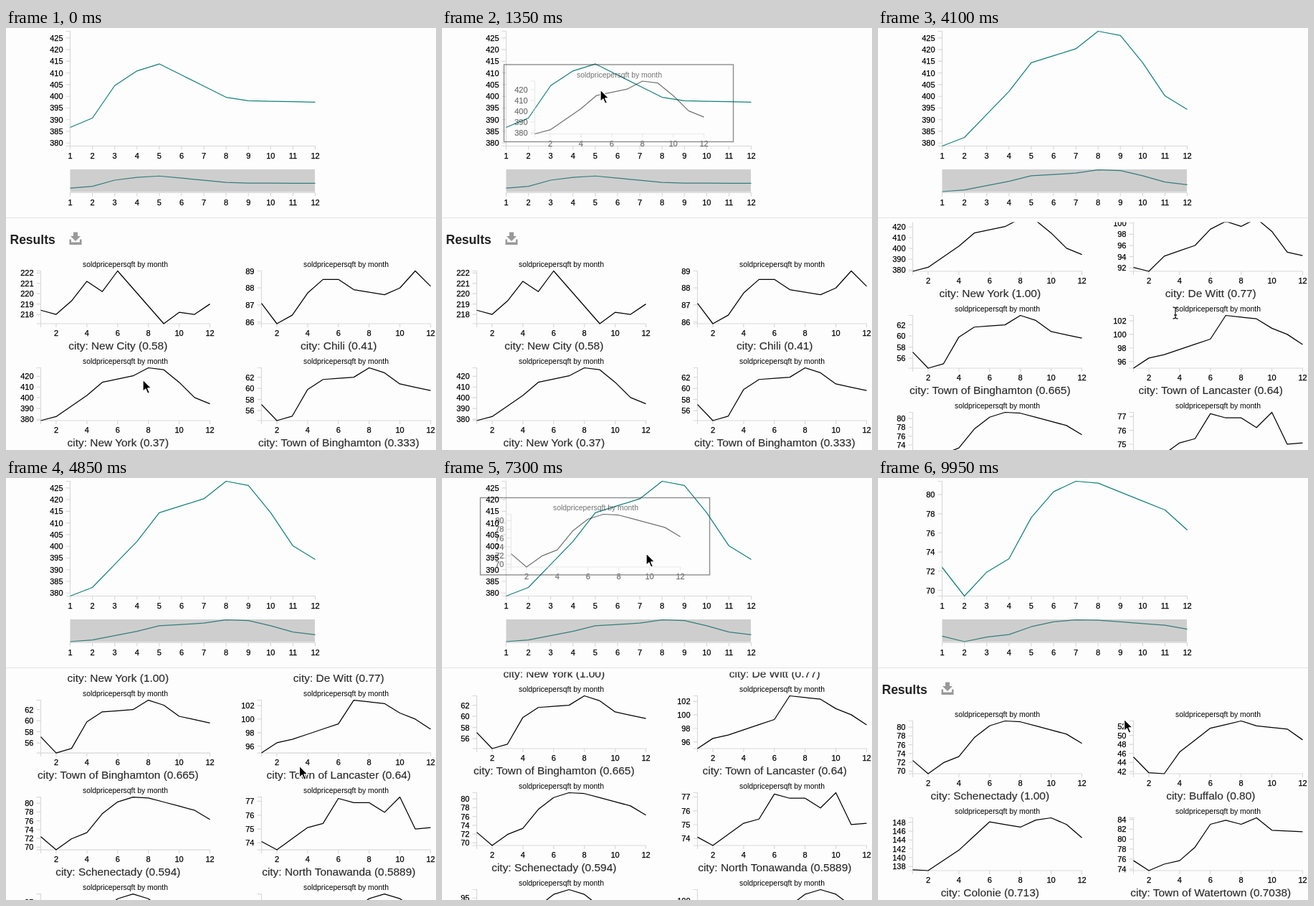
Animation, 600 px wide and 588 px high, one loop 10 s. Source, as an HTML page:

```html
<!DOCTYPE html>
<html lang="en">
<head>
<meta charset="utf-8">
<title>Price trends</title>
<style>
html, body { margin: 0; width: 100%; height: 100%; overflow: hidden; background: #fdfdfd; }
svg { display: block; width: 600px; height: 588px; }
text { font-family: "Liberation Sans", Arial, sans-serif; fill: #000; }
.tick { font-size: 11px; stroke: #000; stroke-width: .25; }
.title { font-size: 10.4px; text-anchor: middle; }
.city { font-size: 15.45px; text-anchor: middle; fill: #2a2a2a; stroke: #2a2a2a; stroke-width: .15; }
.head { font-size: 17.5px; font-weight: bold; fill: #222; }
.axis { fill: none; stroke: #d9d9d9; stroke-width: 1.2; }
.line { fill: none; stroke: #000; stroke-width: 1.25; stroke-linejoin: round; }
.teal { stroke: #14807a; }
</style>
</head>
<body>
<svg viewBox="0 0 600 588">
  <defs><clipPath id="pane"><rect y="270.5" width="600" height="318"/></clipPath></defs>
  <rect width="600" height="588" fill="#fdfdfd"/>
  <g id="mains"></g>
  <path d="M0 264.5H600" stroke="#e3e3e3"/>
  <g clip-path="url(#pane)">
    <g id="scroll">
      <text class="head" x="5.5" y="301">Results</text>
      <path fill="#999" d="M94 284.5h6v5.5h4L97 297 90 290h4zM88.5 294.5h2.5v4h12v-4h2.5v7.5h-17z"/>
      <g id="lists"></g>
    </g>
  </g>
  <path id="spin" fill="#82dada" d="M0-51A51 51 0 0 1 0 51A53.2 51 0 0 0 0-51z"/>
  <g id="ghosts"></g>
  <g id="cursor">
    <path stroke="#fff" stroke-width="1.3" stroke-linejoin="round"
      d="M0 0V16.5L3.9 13 6.6 19.3 9.4 18.1 6.7 12H12z"/>
    <g id="mover"></g>
    <path fill="none" stroke="#222" stroke-width="1.3"
      d="M-3.5-8Q0-8 0-6V6Q0 8-3.5 8M3.5-8Q0-8 0-6V6Q0 8 3.5 8M-2 3H2"/>
  </g>
</svg>
<script>
const LOOP = 10000, ROW = 135, COL = 308, MONTHS = 12;
const $ = id => document.getElementById(id);

// Straight runs between the key values that are given
function fill(keys) {
  const at = Object.keys(keys).map(Number);
  return Array.from({ length: MONTHS }, (_, m) => {
    const b = at.find(i => i >= m), a = at.findLast(i => i <= m);
    return a === b ? keys[a] : keys[a] + (keys[b] - keys[a]) * (m - a) / (b - a);
  });
}

// One season that rises to a peak month
const season = (lo, hi, peak) =>
  Array.from({ length: MONTHS }, (_, m) => lo + (hi - lo) * Math.exp(-(((m + 1 - peak) / 3.3) ** 2)));

const query = fill([386.7, 390.7, 404.6, 410.9, 413.9, , , 399.6, 398.1, , , 397.5]);
const newYork = fill([378.7, 382.4, , 402.1, 414.4, , 420.4, 427.9, 426.1, 414.4, 400.2, 394.4]);
const binghamton = fill([57.1, 54.2, 55, 59.8, 61.6, , 62, 63.7, 62.8, 60.8, , 59.6]);
const schenectady = fill([72.4, 69.4, 71.9, 73.3, 77.6, 80.3, 81.4, 81.2, , , 78.4, 76.3]);

// name, tick step, monthly values
const lists = [
  [
    ["New City (0.58)", 1, fill([218.4, 218, 219.3, 221.2, 220.2, 222.2, , , 217.1, 218.2, 218, 219])],
    ["Chili (0.41)", 1, fill([87.1, 85.9, 86.4, 87.7, 88.5, 88.5, 87.9, , 87.6, 88, 89, 88.1])],
    ["New York (0.37)", 10, newYork],
    ["Town of Binghamton (0.333)", 2, binghamton]
  ], [
    ["New York (1.00)", 10, newYork],
    ["De Witt (0.77)", 2, fill([92.1, 91.4, 94.1, , 96, 98.9, 100.3, 99.4, 100.8, 98.5, 94.8, 94.2])],
    ["Town of Binghamton (0.665)", 2, binghamton],
    ["Town of Lancaster (0.64)", 2, fill([95, 96.5, 97, , , 99.3, 102.8, , 102.3, 100.9, 100, 98.5])],
    ["Schenectady (0.594)", 2, schenectady],
    ["North Tonawanda (0.5889)", 1, fill([74.1, 73.5, , 75.1, 75.4, 77.2, 76.9, 76.9, 76.2, 77.3, 75, 75.1])],
    ["", 5, season(84, 97, 7)],
    ["", 5, season(87, 103.6, 9)]
  ], [
    ["Schenectady (1.00)", 2, schenectady],
    ["Buffalo (0.80)", 2, fill([45.2, 41.7, 41.5, 46.3, , 51.6, , 53.2, 52.1, , 51.4, 49])],
    ["Colonie (0.713)", 2, fill([137.3, 137.1, , 141.7, , 148.1, , 146.9, 148.5, 149, 147.5, 144.5])],
    ["Town of Watertown (0.7038)", 2, fill([75.7, 73.7, 75, 75.7, 78.4, 83, 83.8, 83, 84.3, 81.8, , 81.5])]
  ]
];

const label = (cls, x, y, s, anchor) =>
  `<text class="${cls}" x="${x}" y="${y}"${anchor ? ` text-anchor="${anchor}"` : ""}>${s}</text>`;

const group = s => `<g>${s}</g>`;
const extent = v => [Math.min(...v), Math.max(...v)];
const mapY = (n, [lo, hi], t, b) => b - (n - lo) / (hi - lo) * (b - t);
const mapX = (m, l, r) => l + (r - l) * (m - 1) / (MONTHS - 1);

function curve(v, dom, { l, r, t, b }, cls = "") {
  const pts = v.map((n, i) => `${mapX(i + 1, l, r).toFixed(2)},${mapY(n, dom, t, b).toFixed(2)}`);
  return `<polyline class="line ${cls}" points="${pts.join(" ")}"/>`;
}

function xAxis({ l, r, b }, step) {
  let d = `M${l} ${b + 5}V${b}H${r}V${b + 5}`, s = "";
  for (let m = step; m <= MONTHS; m += step) {
    const x = mapX(m, l, r);
    d += `M${x} ${b}v5`;
    s += label("tick", x, b + 17.2, m, "middle");
  }
  return `<path class="axis" d="${d}"/>` + s;
}

function yAxis(dom, step, { l, t, b }) {
  let d = `M${l - 6} ${t}H${l}V${b}H${l - 6}`, s = "";
  for (let n = Math.ceil(dom[0] / step) * step; n <= dom[1]; n += step) {
    const y = mapY(n, dom, t, b);
    d += `M${l - 6} ${y}h6`;
    s += label("tick", l - 10, y + 4, n, "end");
  }
  return `<path class="axis" d="${d}"/>` + s;
}

const big = { l: 89.5, r: 431.5, t: 4.5, b: 164.5 };
const mini = { ...big, t: 197.6, b: 228 };
const small = { l: 48.5, r: 284.5, t: 338.5, b: 412 };

const mainChart = (v, dom, step) =>
  yAxis(dom, step, big) + xAxis(big, 1) + curve(v, dom, big, "teal") + curve(v, dom, mini, "teal") +
  `<rect x="89.5" y="197" width="341.5" height="31.5" fill="#777" fill-opacity=".35"/>` +
  xAxis({ ...big, b: 229.5 }, 1);

function smallChart(step, v) {
  const dom = extent(v);
  return label("title", 166.5, 333, "soldpricepersqft by month") +
    yAxis(dom, step, small) + xAxis(small, 2) + curve(v, dom, small);
}

const cell = ([name, step, v], i) =>
  `<g transform="translate(${i % 2 * COL} ${Math.floor(i / 2) * ROW})">` + smallChart(step, v) +
  (name && label("city", 156.3, 447.5, "city: " + name)) + "</g>";

const ghost = (step, v) => `<g opacity=".55">${smallChart(step, v)}` +
  `<rect x="5.5" y="315.5" width="320" height="107.5" fill="none" stroke="#333" stroke-width="1.4"/></g>`;

$("mains").innerHTML =
  group(mainChart(query, extent(newYork), 5)) +
  group(mainChart(newYork, extent(newYork), 5)) +
  group(mainChart(schenectady, extent(schenectady), 2));
$("lists").innerHTML = lists.map(l => group(l.map(cell).join(""))).join("");
$("ghosts").innerHTML = group(ghost(10, newYork)) + group(ghost(2, schenectady));

const arms = [0, 90, 180, 270].map(a =>
  `<path transform="rotate(${a})" d="M-1.2 1.2V-4.5H-3.8L0-8.5 3.8-4.5H1.2V1.2z"/>`).join("");
$("mover").innerHTML = `<g stroke="#fff" stroke-width="1.6" stroke-linejoin="round">${arms}</g>` + arms;

// grab: pointer place that leaves the card at rest; rest: its row offset
const drags = [
  { from: 250, to: 1500, grab: [140, 485.5], rest: ROW },
  { from: 6400, to: 7450, grab: [237, 493], rest: 100 }
];
const loads = [
  { from: 1550, to: 2850, angle: 151 - 360 },
  { from: 7500, to: 8350, angle: 139 }
];
// time, x, y
const path = [
  [0, 191, 490], [250, 145, 493], [950, 222, 74], [1350, 221, 86], [2300, 238, 212], [2750, 238, 212],
  [3250, 415, 397], [4700, 415, 397], [6050, 252, 510], [6350, 240, 505], [7300, 285, 105],
  [8050, 286, 56], [8900, 250, 495], [LOOP, 344, 335]
];
const scrolls = [[0, 0], [3250, 0], [3900, 73], [4300, 73], [4950, 170], [7500, 170], [7500, 0], [LOOP, 0]];

function track(keys, t) {
  const i = keys.findIndex(k => k[0] > t);
  const a = keys[i - 1], b = keys[i];
  const p = (t - a[0]) / (b[0] - a[0]), e = p * p * (3 - 2 * p);
  return a.slice(1).map((n, j) => n + (b[j + 1] - n) * e);
}

const during = t => s => t >= s.from && t < s.to;
const done = (list, t) => list.filter(s => t >= s.to).length;
const show = (id, n) => [...$(id).children].forEach((el, i) => el.style.display = i === n ? "" : "none");
const move = (id, x, y, r = 0) => $(id).setAttribute("transform", `translate(${x} ${y}) rotate(${r})`);

function draw(t) {
  const [x, y] = track(path, t);
  const load = loads.find(during(t));
  const drag = drags.findIndex(during(t));

  show("mains", done(drags, t));
  show("lists", load ? -1 : done(loads, t));
  move("scroll", 0, -track(scrolls, t)[0]);

  $("spin").style.display = load ? "" : "none";
  if (load) move("spin", 337, 392, load.angle + (t - load.from) * 0.36);

  show("ghosts", drag);
  if (drag >= 0) {
    const { grab, rest } = drags[drag];
    move("ghosts", x - grab[0], y - grab[1] + rest);
  }

  const brush = drag < 0 && x > 89 && x < 431 && y > 197 && y < 229;
  const overText = t >= 3850 && t < 4350;
  show("cursor", brush ? 1 : overText ? 2 : 0);
  move("cursor", x, y);
}

const start = performance.now();
function tick() {
  draw((performance.now() - start) % LOOP);
  requestAnimationFrame(tick);
}
tick();
</script>
</body>
</html>
```
